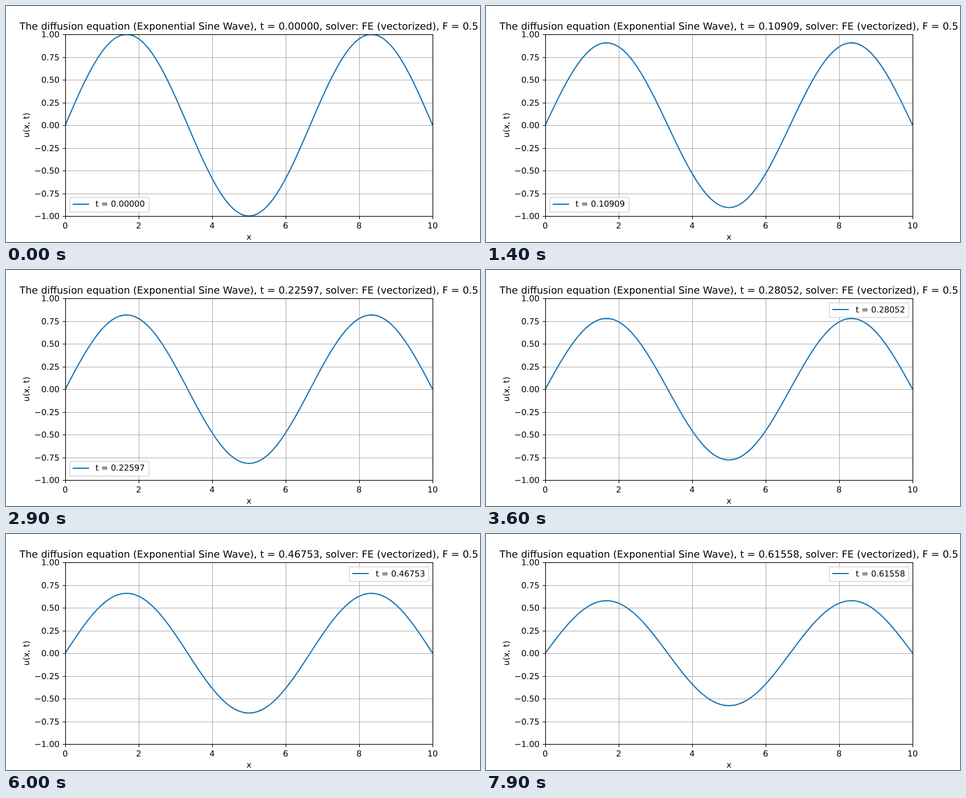
An HTML page for the animation above (8 s loop, 800 px wide and 400 px high).

```html
<!DOCTYPE html>
<html lang="en">
<head>
<meta charset="utf-8">
<title>Diffusion equation</title>
<style>
  html, body { margin: 0; width: 100%; height: 100%; overflow: hidden; background: #fff; }
  svg { display: block; width: 800px; height: 400px; }
  text { font: 13.889px "DejaVu Sans", sans-serif; text-rendering: geometricPrecision; }
  #title { font-size: 16.667px; }
  .middle { text-anchor: middle; }
  .end { text-anchor: end; }
  .axis { fill: none; stroke: #000; stroke-width: 1.11; }
  .grid { stroke: #b0b0b0; stroke-width: 1.11; }
  .wave { fill: none; stroke: #1f77b4; stroke-width: 2.083; stroke-linejoin: round; }
</style>
</head>
<body>
<svg viewBox="0 0 800 400">
  <clipPath id="plot"><rect x="100" y="48" width="620" height="308"/></clipPath>
  <g id="axes"></g>
  <path id="curve" class="wave" clip-path="url(#plot)"/>
  <rect class="axis" x="100.5" y="48.5" width="620" height="308" stroke-linejoin="miter"/>
  <text id="title" class="middle" x="410" y="40"></text>
  <text class="middle" x="410" y="396">x</text>
  <text class="middle" transform="translate(38.5 202) rotate(-90)">u(x, t)</text>
  <g id="legend">
    <rect x="107.5" y="324.5" width="134" height="25" rx="2.78"
      fill="#fff" stroke="#ccc" stroke-width="1.39" opacity=".8"/>
    <path class="wave" d="M112.5 336H140.3"/>
    <text id="label" x="151" y="340"></text>
  </g>
</svg>
<script>
const FRAME_MS = 100, FRAMES = 80;
const CELLS = 80, LENGTH = 10, DX = LENGTH / CELLS, DT = 0.6 / 77;
const WAVE = 3 * Math.PI / LENGTH;
// Forward Euler damps a sine mode by a constant factor per step.
const DECAY = 1 - 4 * DT / DX ** 2 * Math.sin(WAVE * DX / 2) ** 2;
const LEGEND_MOVE = 34;

const byId = id => document.getElementById(id);
const px = x => 100 + 62 * x;
const py = u => 202 - 154 * u;
const snap = v => Math.floor(v + 0.5) + 0.5;

function drawAxes() {
  let grid = '', ticks = '', labels = '';
  for (let x = 0; x <= LENGTH; x += 2) {
    const p = snap(px(x));
    grid += `M${p} 48V356`;
    ticks += `M${p} 356.5v4.86`;
    labels += `<text class="middle" x="${px(x)}" y="377">${x}</text>`;
  }
  for (let u = -1; u <= 1; u += 0.25) {
    const p = snap(py(u));
    grid += `M100 ${p}H720`;
    ticks += `M100.5 ${p}h-4.86`;
    const value = u.toFixed(2).replace('-', '\u2212');
    labels += `<text class="end" x="90.3" y="${Math.round(py(u)) + 5}">${value}</text>`;
  }
  byId('axes').innerHTML =
    `<path class="grid" d="${grid}"/><path class="axis" d="${ticks}"/>${labels}`;
}

function drawStep(step) {
  const time = (step * DT).toFixed(5);
  const amplitude = DECAY ** step;
  const points = Array.from({ length: CELLS + 1 }, (_, i) => {
    const x = i * DX;
    return `${px(x)} ${py(amplitude * Math.sin(WAVE * x)).toFixed(3)}`;
  });
  byId('curve').setAttribute('d', 'M' + points.join('L'));
  byId('title').textContent =
    `The diffusion equation (Exponential Sine Wave), t = ${time}, solver: FE (vectorized), F = 0.5`;
  byId('label').textContent = `t = ${time}`;
  // The legend takes the upper right corner once the crest clears it.
  const moved = step >= LEGEND_MOVE;
  byId('legend').setAttribute('transform', moved ? 'translate(472 -269)' : '');
  byId('label').setAttribute('y', moved ? 341 : 340);
  byId('label').setAttribute('x', moved ? 152 : 151);
}

const start = performance.now();
function tick(now) {
  drawStep(Math.floor(Math.max(0, now - start) / FRAME_MS) % FRAMES);
  requestAnimationFrame(tick);
}
drawAxes();
drawStep(0);
requestAnimationFrame(tick);
</script>
</body>
</html>
```
